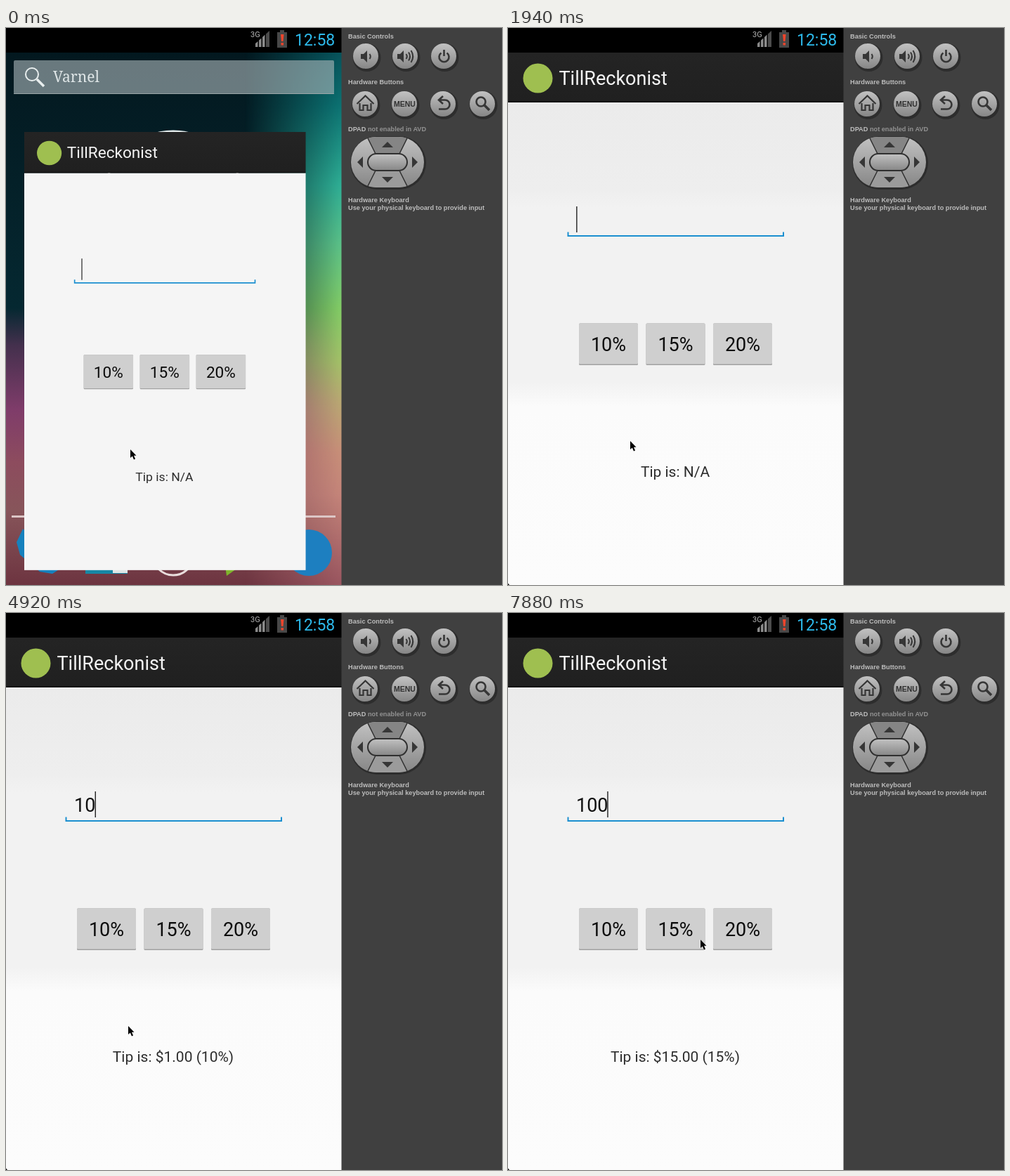
These frames come from a looping animation (706x793 px, 8000 ms). An HTML page:

```html
<!DOCTYPE html>
<html lang="en">
<head>
<meta charset="utf-8">
<title>Tip app in an emulator</title>
<style>
  html, body { margin: 0; width: 100%; height: 100%; overflow: hidden; background: #000; }
  svg { display: block; width: 706px; height: 793px; }
  text { font-family: Roboto, sans-serif; }
  .mid { text-anchor: middle; }
  .panel text { font: bold 9.2px "Liberation Sans", Arial, sans-serif; fill: #bcbcbc; }
  .panel .cap { font-size: 10.5px; fill: #303030; text-anchor: middle; }
  .ink { fill: none; stroke: #363636; stroke-width: 2.6; }
  .solid { fill: #363636; }
</style>
</head>
<body>
<svg viewBox="0 0 706 793">
  <defs>
    <linearGradient id="night" gradientUnits="userSpaceOnUse" x1="0" y1="35" x2="0" y2="793">
      <stop offset="0" stop-color="#03181f"/>
      <stop offset=".48" stop-color="#052831"/>
      <stop offset=".55" stop-color="#44304d"/>
      <stop offset=".67" stop-color="#7f3c6a"/>
      <stop offset=".77" stop-color="#8d4c5e"/>
      <stop offset=".86" stop-color="#87555a"/>
      <stop offset="1" stop-color="#6d3440"/>
    </linearGradient>
    <linearGradient id="dawn" gradientUnits="userSpaceOnUse" x1="0" y1="35" x2="0" y2="793">
      <stop offset="0" stop-color="#07545c"/>
      <stop offset=".1" stop-color="#0c7373"/>
      <stop offset=".25" stop-color="#2fb096"/>
      <stop offset=".36" stop-color="#5cc389"/>
      <stop offset=".48" stop-color="#84ce66"/>
      <stop offset=".58" stop-color="#a4c368"/>
      <stop offset=".65" stop-color="#b9ab72"/>
      <stop offset=".75" stop-color="#c89079"/>
      <stop offset=".83" stop-color="#c5857a"/>
      <stop offset="1" stop-color="#9a5660"/>
    </linearGradient>
    <linearGradient id="fade">
      <stop offset="0" stop-color="#fff" stop-opacity="0"/>
      <stop offset="1" stop-color="#fff"/>
    </linearGradient>
    <mask id="east" maskUnits="userSpaceOnUse" x="340" y="35" width="138" height="758">
      <rect x="340" y="35" width="138" height="758" fill="url(#fade)"/>
    </mask>
    <linearGradient id="paper" x2="0" y2="1">
      <stop offset="0" stop-color="#ebebeb"/>
      <stop offset=".18" stop-color="#eee"/>
      <stop offset=".22" stop-color="#f2f2f2"/>
      <stop offset=".58" stop-color="#f2f2f2"/>
      <stop offset=".63" stop-color="#fbfbfb"/>
      <stop offset="1" stop-color="#fcfcfc"/>
    </linearGradient>
    <linearGradient id="bar" x2="0" y2="1">
      <stop offset="0" stop-color="#242424"/>
      <stop offset=".96" stop-color="#202020"/>
      <stop offset="1" stop-color="#0c0c0c"/>
    </linearGradient>
    <linearGradient id="metal" x2="0" y2="1">
      <stop offset="0" stop-color="#c2c2c2"/>
      <stop offset=".5" stop-color="#a4a4a4"/>
      <stop offset="1" stop-color="#868686"/>
    </linearGradient>
    <clipPath id="pad"><rect x="491" y="155" width="104" height="72" rx="36"/></clipPath>
    <clipPath id="phone"><rect width="478" height="793"/></clipPath>
    <g id="knob">
      <circle cx="1.5" cy="2" r="20" fill="#2d2d2d"/>
      <circle r="18" fill="url(#metal)"/>
    </g>
  </defs>

  <g clip-path="url(#phone)">
    <g id="home">
      <rect y="35" width="478" height="758" fill="url(#night)"/>
      <rect y="35" width="478" height="758" fill="url(#dawn)" mask="url(#east)"/>
      <rect x="11" y="46" width="456" height="48" rx="2" fill="#a9b5b8" fill-opacity=".62"/>
      <path d="M11 93.500H467" stroke="#9aa6a8"/>
      <g fill="none" stroke="#e8eeee">
        <circle cx="37" cy="66" r="9" stroke-width="2"/>
        <path d="M44 73L54 83" stroke-width="3.500"/>
      </g>
      <text x="67" y="77" style="font:21px 'Noto Serif',serif" fill="#dfe6e7">Varnel</text>
      <circle cx="238" cy="247" r="100" fill="none" stroke="#e4eced" stroke-width="3"/>
      <path d="M8 695.500H469" stroke="#dcc6c6" stroke-width="3"/>
      <path d="M15 732L24 713L80 768L66 777L48 774L20 750Z" fill="#1681bd"/>
      <path d="M113 760H173V777H113Z" fill="#1787a5"/>
      <path d="M152 770H173V776H152Z" fill="#dfe5e6"/>
      <circle cx="238" cy="750" r="29" fill="none" stroke="#e9dcdc" stroke-width="3"/>
      <path d="M312 765H335L314 780Z" fill="#7fb52c"/>
      <circle cx="431" cy="747" r="33" fill="#1d7fc0"/>
    </g>

    <g id="app">
      <rect id="page" y="106" width="478" height="687" fill="url(#paper)"/>
      <rect y="35" width="478" height="71" fill="url(#bar)"/>
      <circle cx="42.500" cy="71.500" r="21" fill="#9fbf50"/>
      <text x="72.500" y="80.500" font-size="27" fill="#f4f4f4">TillReckonist</text>
      <path d="M85.500 290.500V296H392V290.500" fill="none" stroke="#1b8fd0" stroke-width="2"/>
      <text id="amount" x="97" y="283" font-size="27" fill="#111"></text>
      <rect id="caret" y="254" width="1.300" height="37" fill="#111"/>
      <g id="keys"></g>
      <text id="tip" class="mid" x="238" y="639" font-size="21" fill="#2c2c2c"></text>
    </g>
    <path id="corner" d="M0 790.500L2 793H0Z"/>

    <rect width="478" height="35"/>
    <text x="348" y="13" font-size="11" fill="#b4b4b4">3G</text>
    <g fill="#8b8b8b">
      <path d="M355 22L358.500 19V27H355ZM360 17.500L363.500 14.500V27H360ZM365 13L368.500 9.500V27H365Z"/>
      <path d="M370 8.500L375 4V27H370Z" fill="#4c4c4c"/>
    </g>
    <path d="M390 3H396V6H400V28H386V6H390Z" fill="#484848"/>
    <path d="M391 9H395.500L394.500 19H392ZM391.500 21H395V24.500H391.500Z" fill="#f0452c"/>
    <text x="411" y="24.500" font-size="23" fill="#2db9ea">12:58</text>
  </g>

  <g class="panel">
    <rect x="477.500" width="228.500" height="793" fill="#404040"/>
    <text x="487" y="15">Basic Controls</text>
    <text x="487" y="79.500">Hardware Buttons</text>
    <text x="487" y="147">DPAD <tspan fill="#929292">not enabled in AVD</tspan></text>
    <text x="487" y="247.500">Hardware Keyboard</text>
    <text x="487" y="258.500">Use your physical keyboard to provide input</text>
    <g id="knobs"></g>

    <path class="solid" d="M505 37H509L514 32V49L509 44H505Z"/>
    <path class="ink" d="M517.500 37Q520 40.500 517.500 44" style="stroke-width:2"/>
    <path class="solid" d="M557 37H561L566 32V49L561 44H557Z"/>
    <path class="ink" d="M569.500 37Q572 40.500 569.500 44M573 34.500Q577 40.500 573 46.500M576.500 32Q582 40.500 576.500 49" style="stroke-width:2"/>
    <path class="ink" d="M619.500 35.500A7 7 0 1 0 627.500 35.500M623.500 31V40"/>
    <path class="ink" d="M499.500 108L511.500 96.500L523.500 108M503.500 107V117H508.500V110H514.500V117H519.500V107" style="stroke-width:2.200"/>
    <text class="cap" x="567.500" y="112">MENU</text>
    <path class="ink" d="M622 97L616 102.500L622 108M617 102.500H625A6.500 6.500 0 0 1 625 115.500H616"/>
    <circle class="ink" cx="676" cy="105" r="6.500"/>
    <path class="ink" d="M681 110L688 117" style="stroke-width:3.500"/>

    <rect x="490" y="154" width="108" height="76" rx="38" fill="#2d2d2d"/>
    <g clip-path="url(#pad)">
      <rect x="491" y="155" width="104" height="72" fill="url(#metal)"/>
      <path d="M514 155H572L559 181H527Z" fill="#858585"/>
      <path d="M527 201H559L572 227H514Z" fill="#9b9b9b"/>
      <path d="M514 155L527 181M572 155L559 181M514 227L527 201M572 227L559 201" stroke="#303030" stroke-width="1.500"/>
    </g>
    <rect x="515" y="179" width="56" height="24" rx="12" fill="url(#metal)" stroke="#303030" stroke-width="2"/>
    <path class="solid" d="M535 170L543 162L551 170ZM535 212L543 220L551 212ZM508 183L500 191L508 199ZM578 183L586 191L578 199Z"/>
  </g>

  <path id="mouse" d="M0 0V12L2.800 9.500L5 14.500L7 13.500L5 8.800H8.500Z" stroke="#fff" stroke-width="1" paint-order="stroke"/>
</svg>

<script>
const LOOP = 8000;
const $ = id => document.getElementById(id);

$('knobs').innerHTML = [[512, 40], [568, 40], [623, 40], [511, 108], [567, 108], [622, 108], [678, 108]]
  .map(([x, y]) => `<use href="#knob" x="${x}" y="${y}"/>`).join('');

$('keys').innerHTML = [10, 15, 20].map((rate, i) => {
  const x = 101 + 95.5 * i;
  return `<rect x="${x}" y="420.5" width="84" height="59.500" rx="1.500" fill="#a2a2a2"/>
    <rect x="${x}" y="420.5" width="84" height="58" rx="1.500" fill="#cfcfcf"/>
    <text class="mid" x="${x + 42}" y="460" font-size="27" fill="#0c0c0c">${rate}%</text>`;
}).join('');

// Step tracks: [start time, value...]
const bills = [[0, ''], [3280, '1'], [4920, '10'], [5660, '100']];
const blinks = [0, 450, 750, 1490, 1940, 2540, 2980, 3880, 4320, 5360, 5660, 6100, 6550, 7140, 7590];
const moves = [
  [0, 177, 600], [750, 176, 596], [895, 175, 591], [1040, 174, 588],
  [6550, 188, 544], [6700, 220, 502], [6850, 235, 473], [6990, 236, 471],
  [7590, 247, 469], [7735, 263, 467], [7880, 274, 465]
];
const at = (track, t) => track.findLast(step => step[0] <= t);

function put(id, text) {
  const el = $(id);
  if (el.textContent !== text) el.textContent = text;
}

function draw(t) {
  const opening = t < 150;
  $('home').style.display = opening ? '' : 'none';
  $('corner').style.display = opening ? 'none' : '';
  $('app').setAttribute('transform', opening ? 'matrix(.838 0 0 .823 26 119.2)' : '');
  $('page').setAttribute('fill', opening ? '#f5f5f5' : 'url(#paper)');

  const bill = at(bills, t)[1];
  const rate = t < 7290 ? 10 : 15;
  put('amount', bill);
  put('tip', 'Tip is: ' + (bill ? `$${(bill * rate / 100).toFixed(2)} (${rate}%)` : 'N/A'));

  const flips = blinks.filter(time => time <= t).length;
  $('caret').setAttribute('x', 97.2 + 14.7 * bill.length);
  $('caret').style.display = flips % 2 ? '' : 'none';

  const [, x, y] = at(moves, t);
  $('mouse').setAttribute('transform', `translate(${x} ${y})`);
}

function tick() {
  draw(performance.now() % LOOP);
  requestAnimationFrame(tick);
}
tick();
</script>
</body>
</html>
```
